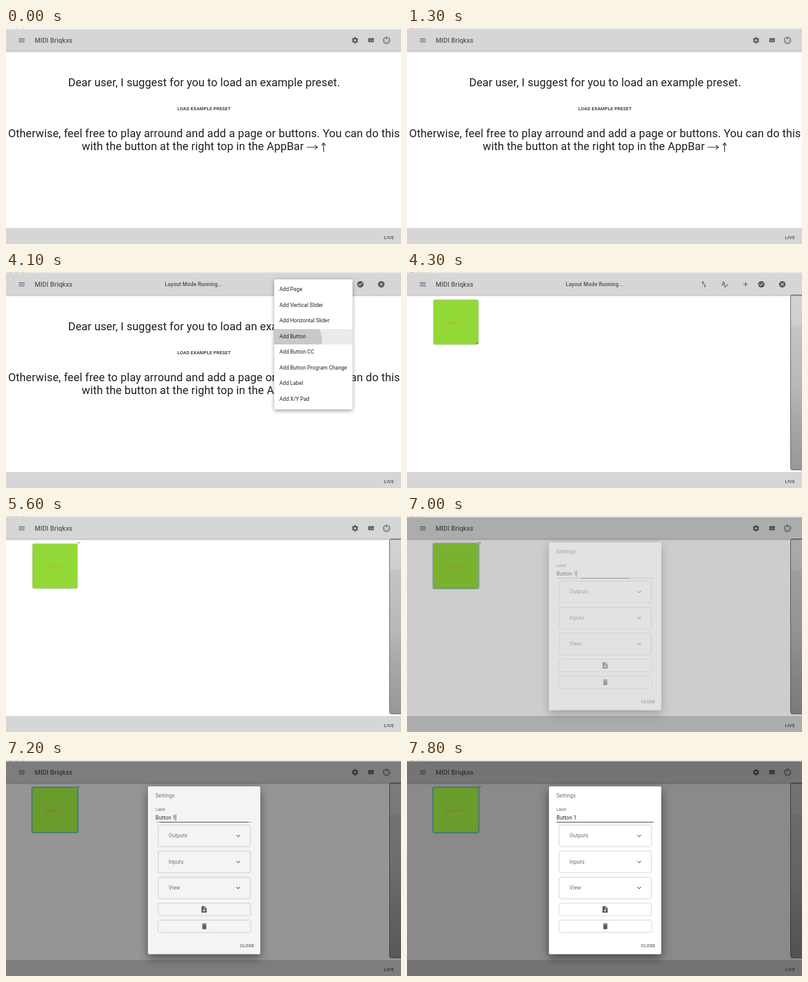
These frames come from a looping animation (640x352 px, 8 s). An HTML page:

```html
<!DOCTYPE html>
<html lang="en">
<head>
<meta charset="utf-8">
<title>Layout editor</title>
<style>
  html, body { margin: 0; width: 100%; height: 100%; overflow: hidden; background: #fff; }
  svg { display: block; width: 640px; height: 352px; font-family: Roboto, Arial, sans-serif; }

  .h4 { font-size: 18.03px; letter-spacing: .00735em; fill: #1f1f1f; }
  .h6 { font-size: 10.6px; font-weight: 500; letter-spacing: .0075em; fill: #545b60; }
  .body { font-size: 8.48px; letter-spacing: .00938em; fill: #212121; }
  .mode { font-size: 8.48px; font-weight: 500; letter-spacing: .02em; fill: #484e53; }
  .btn { font-size: 7.42px; font-weight: 500; letter-spacing: .02857em; }
  .hint { font-size: 6.36px; letter-spacing: .00938em; fill: #666; }
  .tip text { font-size: 5.3px; font-weight: 500; fill: #fff; }
  .tip rect { fill: #616161; opacity: .9; }
  .mid { text-anchor: middle; }
  .grey { fill: #6d6d6d; }
  .icon { fill: #4d5a63; }
  .line { fill: none; stroke: #4d5a63; }
  .bar { fill: #d6d6d6; filter: drop-shadow(0 1px 1.5px rgba(0,0,0,.4)); }
  .card { fill: #fff; filter: drop-shadow(0 .8px .8px rgba(0,0,0,.38)); }
  .popup { fill: #fff; filter: drop-shadow(0 2px 3px rgba(0,0,0,.4)); }
  .modal { fill: #fff; filter: drop-shadow(0 6px 8px rgba(0,0,0,.5)); }

  [class*="t-"] { animation: 8s linear infinite; }
  .t-blur { animation-name: blur; animation-timing-function: step-end; }
  .t-focus { animation-name: focus; animation-timing-function: step-end; }
  .t-idle { animation-name: idle; animation-timing-function: step-end; }
  .t-edit { animation-name: edit; animation-timing-function: step-end; }
  .t-intro { animation-name: intro; animation-timing-function: step-end; }
  .t-made { animation-name: made; animation-timing-function: step-end; }
  .t-handle { animation-name: handle; animation-timing-function: step-end; }
  .t-down { animation-name: down; animation-timing-function: step-end; }
  .t-up { animation-name: up; animation-timing-function: step-end; }
  .t-first { animation-name: first; animation-timing-function: step-end; }
  .t-pick { animation-name: pick; animation-timing-function: step-end; }
  .t-caret { animation-name: caret; animation-timing-function: step-end; }
  .t-tip1 { animation-name: tip1; }
  .t-tip2 { animation-name: tip2; }
  .t-halo { animation-name: halo; }
  .t-menu { animation-name: menu; transform-origin: 498px 28px; }
  .t-ripple { animation-name: ripple; transform-origin: 470px 112px; }
  .t-open { animation-name: open; }
  .t-under { animation-name: under; transform-origin: 321px 101px; }
  .t-green { animation-name: green; }
  .t-label { animation-name: label; }

  @keyframes blur { 0% { opacity: 1 } 12.5%, 100% { opacity: 0 } }
  @keyframes focus { 0% { opacity: 0 } 12.5%, 100% { opacity: 1 } }
  @keyframes idle { 0% { opacity: 1 } 21.25% { opacity: 0 } 65%, 100% { opacity: 1 } }
  @keyframes edit { 0% { opacity: 0 } 21.25% { opacity: 1 } 65%, 100% { opacity: 0 } }
  @keyframes intro { 0% { opacity: 1 } 52.5%, 100% { opacity: 0 } }
  @keyframes made { 0% { opacity: 0 } 52.5%, 100% { opacity: 1 } }
  @keyframes handle { 0% { opacity: 0 } 52.5% { opacity: 1 } 65%, 100% { opacity: 0 } }
  @keyframes down { 0% { opacity: 0 } 65% { opacity: 1 } 86.25%, 100% { opacity: 0 } }
  @keyframes up { 0% { opacity: 0 } 86.25%, 100% { opacity: 1 } }
  @keyframes first { 0% { opacity: 1 } 41.25%, 100% { opacity: 0 } }
  @keyframes pick { 0% { opacity: 0 } 43.75%, 100% { opacity: 1 } }
  @keyframes caret { 0% { opacity: 1 } 93.75%, 100% { opacity: 0 } }
  @keyframes tip1 { 0%, 21.9% { opacity: 0 } 22.5%, 29.9% { opacity: 1 } 30% { opacity: .6 } 32.5%, 100% { opacity: 0 } }
  @keyframes tip2 { 0%, 32.4% { opacity: 0 } 32.5% { opacity: .4 } 35%, 37.49% { opacity: .88 } 37.5% { opacity: .5 } 38.75%, 100% { opacity: 0 } }
  @keyframes halo { 0%, 29.9% { opacity: 0 } 30% { opacity: .5 } 32.5%, 37.49% { opacity: 1 } 38.75%, 100% { opacity: 0 } }
  @keyframes menu {
    0%, 37.49% { opacity: 0; transform: scale(.75, .56) }
    37.5% { opacity: .55; transform: scale(.92, .85) }
    38.75%, 52.49% { opacity: 1; transform: none }
    52.5% { opacity: .5; transform: none }
    53.75%, 100% { opacity: 0; transform: none }
  }
  @keyframes ripple {
    0%, 47.49% { opacity: 0; transform: scale(.2) }
    47.5% { opacity: .6; transform: scale(.3) }
    48.75% { opacity: 1; transform: scale(.55) }
    51.25% { opacity: 1; transform: scale(1) }
    53.75%, 100% { opacity: 0; transform: scale(1.3) }
  }
  @keyframes open { 0%, 85.6% { opacity: 0 } 88.75% { opacity: .7 } 90% { opacity: .9 } 91.25%, 100% { opacity: 1 } }
  @keyframes under { 0%, 85.6% { transform: scaleX(0) } 88.75% { transform: scaleX(.85) } 91.25%, 100% { transform: none } }
  @keyframes green { 0%, 85.6% { fill: #92d836 } 88.75% { fill: #679a2a } 91.25%, 100% { fill: #6a9d2b } }
  @keyframes label { 0%, 85.6% { fill: #c9b033 } 88.75%, 100% { fill: #93762c } }
</style>
</head>
<body>
<svg viewBox="0 0 640 352">
  <defs>
    <linearGradient id="shade" x1="0" y1="0" x2="0" y2="1">
      <stop offset="0" stop-color="#d4d4d4"/>
      <stop offset=".17" stop-color="#cecece"/>
      <stop offset=".18" stop-color="#c4c4c4"/>
      <stop offset=".52" stop-color="#b8b8b8"/>
      <stop offset=".7" stop-color="#a9a9a9"/>
      <stop offset="1" stop-color="#979797"/>
    </linearGradient>
    <clipPath id="row"><rect x="434.5" y="93" width="127" height="25"/></clipPath>
    <path id="more" d="M16.59 8.59L12 13.17 7.41 8.59 6 10l6 6 6-6z"/>
  </defs>
  <rect width="640" height="352" fill="#fff"/>

  <g class="t-intro">
    <text class="h4 mid" x="321" y="95">Dear user, I suggest for you to load an example preset.</text>
    <text class="btn mid" x="321" y="134.2" fill="#222">LOAD EXAMPLE PRESET</text>
    <text class="h4 mid" x="320.8" y="178">Otherwise, feel free to play arround and add a page or buttons. You can do this</text>
    <text class="h4" x="122.8" y="199">with the button at the right top in the AppBar</text>
    <path d="M487.5 194.3H504.5M500.5 190.8L504.5 194.3L500.5 197.8M514.6 202V187.5M511.4 191.5L514.6 187.5L517.8 191.5" fill="none" stroke="#1f1f1f" stroke-width="1.1"/>
  </g>

  <g class="t-made">
    <rect x="621.5" y="37.5" width="24" height="285" rx="3" fill="url(#shade)" stroke="#666"/>
  </g>
  <path class="t-down" d="M115.6 42.6L117.6 44.6L119.6 42.6" fill="none" stroke="#555"/>
  <path class="t-up" d="M115.6 44.6L117.6 42.6L119.6 44.6" fill="none" stroke="#555"/>

  <rect class="bar" x="-4" y="2" width="648" height="35"/>
  <rect y="326" width="640" height="26" fill="#d6d6d6"/>
  <text class="btn" x="612.6" y="344.2" fill="#505050">LIVE</text>
  <path class="icon" transform="translate(19.2 13.7) scale(.53)" d="M3 18h18v-2H3v2zm0-5h18v-2H3v2zm0-7v2h18V6H3z"/>
  <text class="h6" x="46.4" y="23.9">MIDI Briqkxs</text>

  <g class="t-idle">
    <g class="line" transform="translate(565.6 20)">
      <circle r="3" stroke-width="2.3"/>
      <circle r="4.5" stroke-width="1.6" pathLength="12" stroke-dasharray="1" stroke-dashoffset="-.5"/>
    </g>
    <path class="icon" transform="translate(584.9 13.8) scale(.53)" d="M10 18h5v-6h-5v6zm-6 0h5V5H4v13zm12 0h5v-6h-5v6zM10 5v6h11V5H10z"/>
    <g class="line" transform="translate(610.2 13.7) scale(.53)">
      <circle cx="12" cy="12" r="10" stroke-width="2"/>
      <path stroke-width="3" stroke-linecap="round" d="M6.5 11.5h.01M10.5 6.5h3M8.5 16.5h.01M15.5 16.5h.01M17.5 11.5h.01"/>
    </g>
  </g>

  <g class="t-edit">
    <text class="mode" x="257.3" y="23">Layout Mode Running...</text>
    <circle class="t-halo" cx="548.5" cy="20" r="12.5" fill="#000" fill-opacity=".075"/>
    <g class="icon">
      <path transform="translate(474.7 13.7) scale(.53)" d="M16 17.01V10h-2v7.01h-3L15 21l4-3.99h-3zM9 3L5 6.99h3V14h2V6.99h3L9 3z"/>
      <path transform="translate(508.4 13.7) scale(.53)" d="M12.45 16h2.09L9.43 3H7.57L2.46 16h2.09l1.12-3h5.64l1.14 3zm-6.02-5L8.5 5.48 10.57 11H6.43zm15.16.59l-8.09 8.09L9.83 16l-1.41 1.41 5.09 5.09L23 13l-1.41-1.41z"/>
      <path transform="translate(542.2 13.7) scale(.53)" d="M19 13h-6v6h-2v-6H5v-2h6V5h2v6h6v2z"/>
      <path transform="translate(567.8 13.7) scale(.53)" d="M12 2a10 10 0 1 0 0 20 10 10 0 0 0 0-20zm-2 15l-5-5 1.41-1.41L10 14.17l7.59-7.59L19 8l-9 9z"/>
      <path transform="translate(601.7 13.7) scale(.53)" d="M12 2a10 10 0 1 0 0 20 10 10 0 0 0 0-20zm5 13.59L15.59 17 12 13.41 8.41 17 7 15.59 10.59 12 7 8.41 8.41 7 12 10.59 15.59 7 17 8.41 13.41 12 17 15.59z"/>
    </g>
  </g>
  <g class="tip t-tip1">
    <rect x="592" y="40" width="32" height="12" rx="2"/>
    <text class="mid" x="608" y="47.9">Discard</text>
  </g>
  <g class="tip t-tip2">
    <rect x="527.5" y="40" width="42.5" height="12" rx="2"/>
    <text class="mid" x="548.8" y="47.9">Add Elements</text>
  </g>

  <g class="t-menu">
    <rect class="popup" x="434.5" y="12" width="127" height="212" rx="2"/>
    <rect class="t-first" x="434.5" y="16" width="127" height="25.4" fill="#ebebeb"/>
    <rect class="t-pick" x="434.5" y="93" width="127" height="25" fill="#ebebeb"/>
    <g clip-path="url(#row)"><circle class="t-ripple" cx="470" cy="112" r="42" fill="#c9c9c9"/></g>
    <g class="body">
      <text x="443" y="31.4">Add Page</text>
      <text x="443" y="56.9">Add Vertical Slider</text>
      <text x="443" y="82.3">Add Horizontal Slider</text>
      <text x="443" y="107.8">Add Button</text>
      <text x="443" y="133.2">Add Button CC</text>
      <text x="443" y="158.7">Add Button Program Change</text>
      <text x="443" y="184.1">Add Label</text>
      <text x="443" y="209.6">Add X/Y Pad</text>
    </g>
  </g>

  <rect class="t-open" width="640" height="352" fill="#000" fill-opacity=".46"/>

  <g class="t-made">
    <g style="filter: drop-shadow(0 .8px 1px rgba(0,0,0,.4))">
      <rect class="t-green" x="43" y="45.5" width="72.5" height="72.5" rx="2" fill="#92d836"/>
    </g>
    <text class="btn mid t-label" x="78" y="84.5" fill="#c9b033">Button 1</text>
    <path class="t-handle" d="M114.5 113.5V116.5H111.5" fill="none" stroke="#5d8a22"/>
    <rect class="t-open" x="42" y="44.2" width="74.6" height="74.2" rx="2.5" fill="none" stroke="#3a737c" stroke-width="1.6"/>
  </g>

  <g class="t-open">
    <rect class="modal" x="230" y="43" width="182" height="273.5" rx="2.2"/>
    <text class="body grey" x="242" y="60.6">Settings</text>
    <text class="hint" x="242.3" y="83.2">Label</text>
    <text class="body" x="242.3" y="96.6">Button 1</text>
    <rect class="t-caret" x="274.6" y="88.5" width=".9" height="10.5" fill="#333"/>
    <rect x="242.5" y="101" width="157" height=".6" fill="#8a8a8a"/>
    <rect class="t-under" x="242.5" y="100.8" width="157" height="1.2" fill="#4d5a63"/>
    <g class="card">
      <rect x="247" y="106.5" width="148.5" height="34" rx="1.5"/>
      <rect x="247" y="149" width="148.5" height="34" rx="1.5"/>
      <rect x="247" y="191.5" width="148.5" height="34" rx="1.5"/>
      <rect x="247" y="234" width="148.5" height="19" rx="1.5"/>
      <rect x="247" y="261.5" width="149" height="19" rx="1.5"/>
    </g>
    <path d="M247 140V106.6H395.5V140M247 183V149.1H395.5V183M247 225V191.6H395.5V225" fill="none" stroke="#e2e2e2" stroke-width=".7"/>
    <g class="body grey">
      <text x="263.6" y="126.4">Outputs</text>
      <text x="263.6" y="168.9">Inputs</text>
      <text x="263.6" y="211.2">View</text>
    </g>
    <g class="icon">
      <use href="#more" transform="translate(369.9 117.2) scale(.53)"/>
      <use href="#more" transform="translate(369.9 159.7) scale(.53)"/>
      <use href="#more" transform="translate(369.9 202) scale(.53)"/>
      <path transform="translate(314.6 237.1) scale(.53)" d="M14 2H6c-1.1 0-1.99.9-1.99 2L4 20c0 1.1.89 2 1.99 2H18c1.1 0 2-.9 2-2V8l-6-6zm2 14h-3v3h-2v-3H8v-2h3v-3h2v3h3v2zm-3-7V3.5L18.5 9H13z"/>
      <path transform="translate(315 264.7) scale(.53)" d="M6 19c0 1.1.9 2 2 2h8c1.1 0 2-.9 2-2V7H6v12zM19 4h-3.5l-1-1h-5l-1 1H5v2h14V4z"/>
    </g>
    <text class="btn" x="379" y="305.2" fill="#5c5c5c">CLOSE</text>
  </g>

  <!-- window title bar edge -->
  <g class="t-blur">
    <rect width="640" height="2.2" fill="#f4f4f4"/>
    <path d="M5 0h5M15 0h5M25 0h5" stroke="#d0d0d0" stroke-width="1.4"/>
  </g>
  <g class="t-focus">
    <rect width="640" height="2.2" fill="#e4e4e4"/>
    <g stroke-width="1.4">
      <path d="M5 0h5" stroke="#ee8a84"/>
      <path d="M15 0h5" stroke="#eccb80"/>
      <path d="M25 0h5" stroke="#96cf8c"/>
    </g>
  </g>
</svg>
</body>
</html>
```
